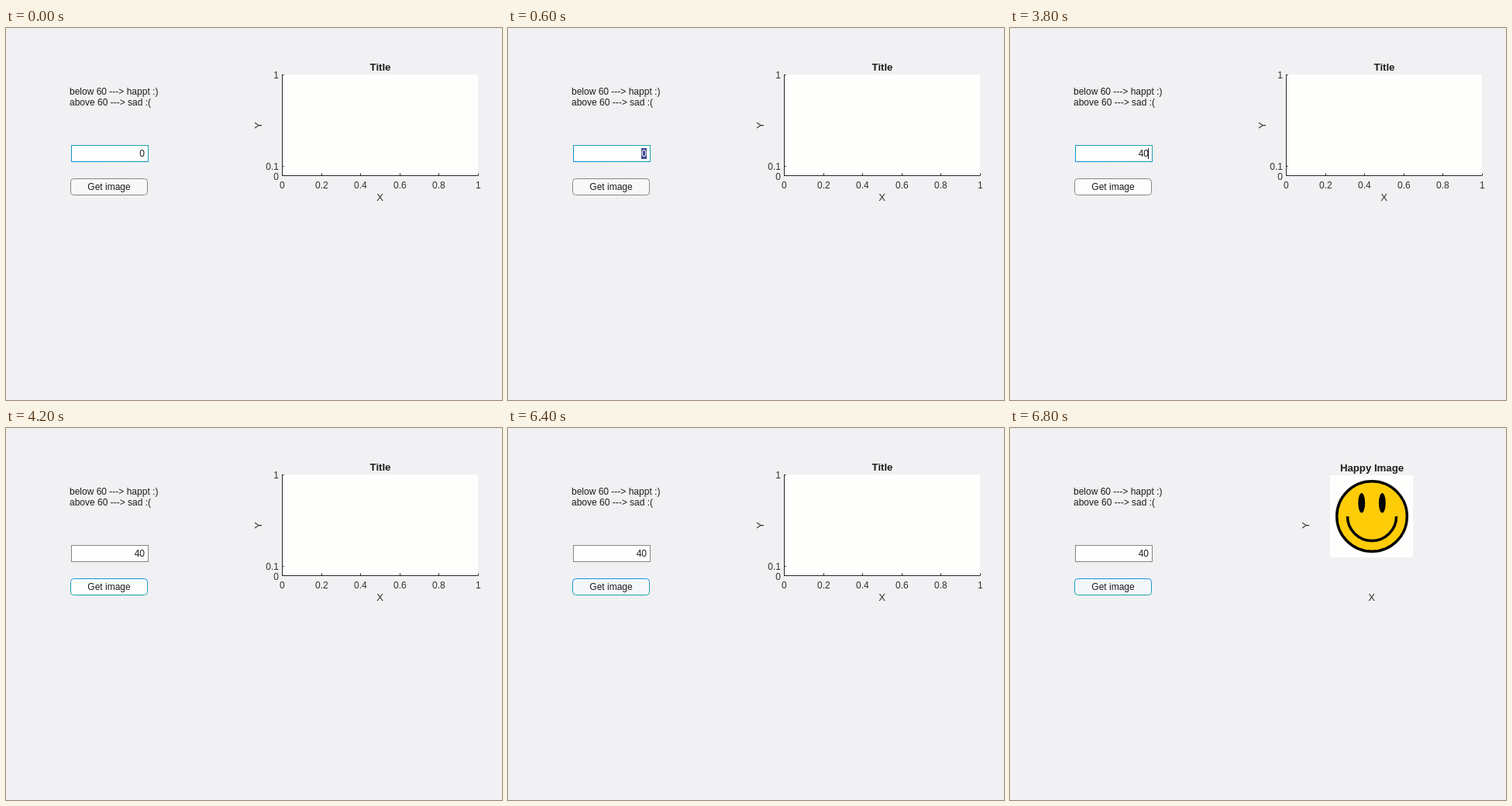
Animation, 640 px wide and 480 px high, one loop 8 s. Source, as an HTML page:

```html
<!DOCTYPE html>
<html lang="en">
<head>
<meta charset="utf-8">
<title>Get image</title>
<style>
  html, body { margin: 0; width: 100%; height: 100%; overflow: hidden; background: #f1f1f4; }
  svg { display: block; width: 640px; height: 480px; }
  text { font: 12px "Liberation Sans", Arial, sans-serif; fill: #1c1c1c; }
  .title { font-size: 13.2px; font-weight: bold; }
  .label { font-size: 13.2px; fill: #303030; }
  .tick { fill: #303030; }
  .mid { text-anchor: middle; }
  .end { text-anchor: end; }
</style>
</head>
<body>
<svg viewBox="0 0 640 480">
  <defs>
    <linearGradient id="fieldFocus" x1="0" y1="1" x2="1" y2="0">
      <stop offset="0" stop-color="#128fdc"/><stop offset="1" stop-color="#1ba3a0"/>
    </linearGradient>
    <linearGradient id="buttonFocus" x1="0" y1="0" x2="0" y2="1">
      <stop offset="0" stop-color="#1492de"/><stop offset="1" stop-color="#1aa59c"/>
    </linearGradient>
  </defs>
  <rect width="640" height="480" fill="#f1f1f4"/>
  <text x="82" y="86">below 60 ---&gt; happt :)</text>
  <text x="82" y="100">above 60 ---&gt; sad :(</text>

  <rect id="field" x="84.5" y="151.5" width="99" height="21" fill="#fefefe"/>
  <rect id="selection" x="172" y="155" width="7" height="14" fill="#3d4a90"/>
  <text id="value" class="end" x="179" y="166"></text>
  <rect id="caret" x="178" y="155" width="1" height="14" fill="#111"/>

  <rect id="button" x="83.5" y="194.5" width="99" height="21" rx="4"/>
  <text class="mid" x="133" y="209">Get image</text>

  <g id="plot">
    <rect x="356" y="60" width="253" height="130" fill="#fefefd"/>
    <path id="axes" fill="none" stroke="#262626"/>
    <g id="ticks"></g>
  </g>

  <g id="picture">
    <rect id="paper" x="413" fill="#fefefd"/>
    <g id="face" stroke="#050505" stroke-width="3.5">
      <circle r="46" fill="#ffcc08"/>
      <path d="M-32 0A32 32 0 0 0 32 0" fill="none"/>
      <g fill="#050505" stroke="none">
        <ellipse cx="-13.5" cy="-17.5" rx="4.5" ry="13"/>
        <ellipse cx="13.5" cy="-17.5" rx="4.5" ry="13"/>
      </g>
    </g>
  </g>
  <text id="title" class="title mid"></text>
  <text id="xLabel" class="label mid" y="223">X</text>
  <text id="yLabel" class="label mid">Y</text>
</svg>
<script>
const LOOP = 8000;
const $ = id => document.getElementById(id);
const set = (id, attrs) => {
  for (const name in attrs) $(id).setAttribute(name, attrs[name]);
};
const show = (id, on) => set(id, { visibility: on ? "visible" : "hidden" });

function addTick(label, x, y, anchor) {
  const text = document.createElementNS("http://www.w3.org/2000/svg", "text");
  text.setAttribute("class", "tick " + anchor);
  text.setAttribute("x", x);
  text.setAttribute("y", y);
  text.textContent = label;
  $("ticks").append(text);
}

function buildPlot() {
  let d = "M356.5 60V190.5H609.5";
  for (let i = 0; i <= 5; i++) {
    const x = Math.round(356 + i * 50.6);
    d += `M${x + 0.5} 190v-2.5`;
    addTick(i / 5, x + 0.3, 207, "mid");
  }
  for (const [label, y] of [["1", 60], ["0.1", 178], ["0", 190]]) {
    d += `M356 ${y + 0.5}h2.5`;
    addTick(label, 352, y + (label === "0" ? 6 : 5), "end");
  }
  set("axes", { d });
}

function render(t) {
  const selected = t >= 600 && t < 2600;
  const buttonFocused = t >= 4200;
  const hovered = t >= 3800 && t < 6000;
  const loaded = t >= 6600;
  const settled = t >= 6800;

  $("value").textContent = t < 2600 ? "0" : t < 2800 ? "4" : "40";
  $("value").style.fill = selected ? "#fff" : "#1c1c1c";
  show("selection", selected);
  show("caret", (t >= 2600 && t < 3400) || (t >= 3800 && t < 4200));
  set("field", { stroke: buttonFocused ? "#858585" : "url(#fieldFocus)" });
  set("button", {
    stroke: buttonFocused ? "url(#buttonFocus)" : "#858585",
    fill: hovered ? "#fdfdfe" : buttonFocused ? "#f6f7fb" : "#f8f8f8"
  });

  show("plot", !loaded);
  show("picture", loaded);
  set("paper", settled
    ? { y: 61, width: 107, height: 106 }
    : { y: 60, width: 108, height: 108 });
  set("face", {
    transform: `translate(467 ${settled ? 114 : 113.5}) scale(${settled ? 0.985 : 1})`
  });

  $("title").textContent = loaded ? "Happy Image" : "Title";
  set("title", { x: loaded ? 467 : 483, y: settled ? 56 : 55 });
  set("xLabel", { x: loaded ? 466.7 : 482.7 });
  const labelY = loaded && !settled ? 124.5 : 125.5;
  set("yLabel", { transform: `translate(${loaded ? 385.5 : 329.5} ${labelY}) rotate(-90)` });
}

buildPlot();
const start = performance.now();
function frame() {
  render((performance.now() - start) % LOOP);
  requestAnimationFrame(frame);
}
frame();
</script>
</body>
</html>
```
